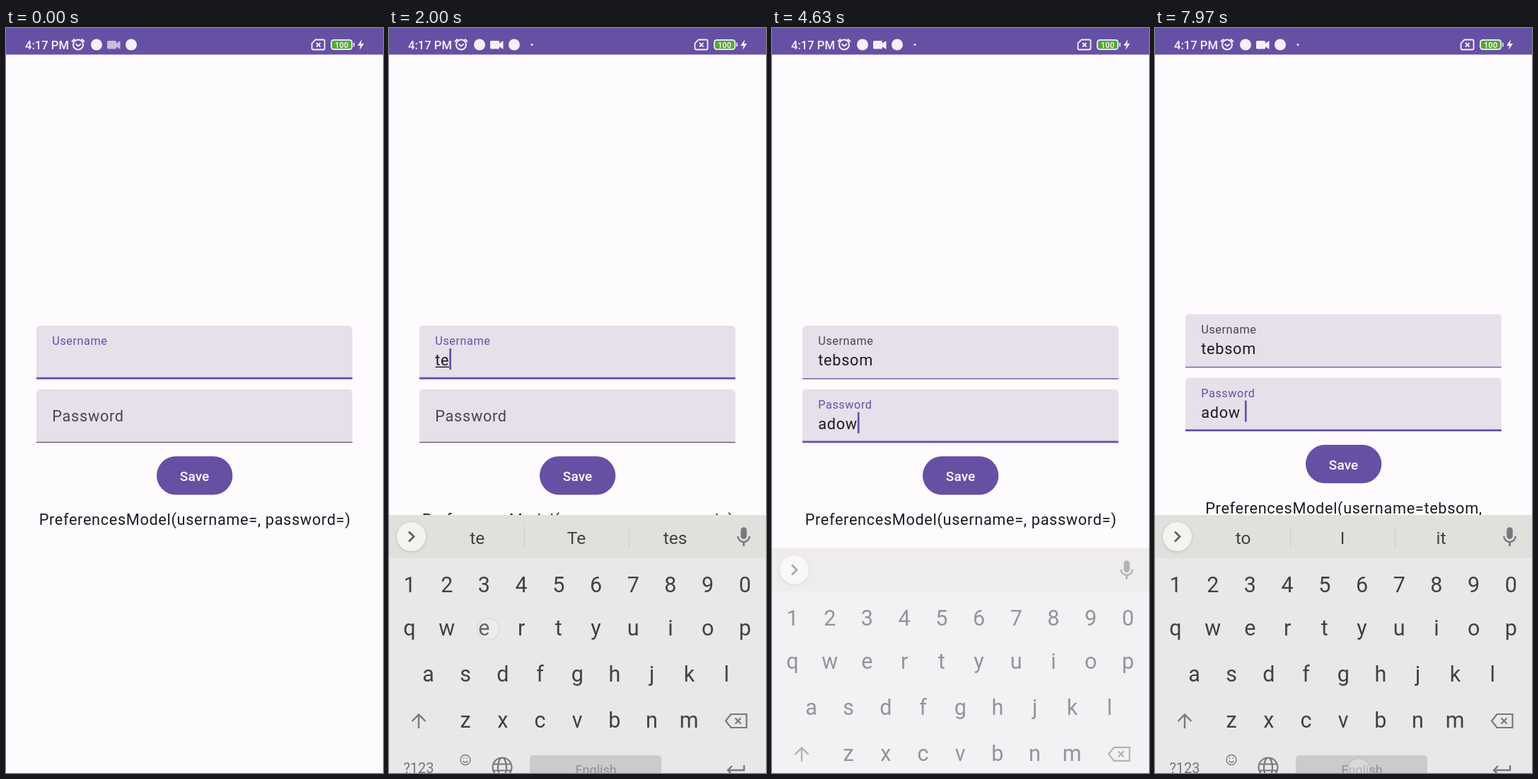
An HTML page with a canvas for the animation above (8 s loop, 533 px wide and 1051 px high).

```html
<!DOCTYPE html>
<html lang="en">
<head>
<meta charset="utf-8">
<title>Saved preferences</title>
<style>
  html, body { margin: 0; width: 100%; height: 100%; overflow: hidden; background: #fefbff; }
  canvas { display: block; width: 533px; height: 1051px; }
</style>
</head>
<body>
<canvas id="stage"></canvas>
<script>
const W = 533, H = 1051, LOOP = 8000;
const canvas = document.getElementById('stage');
const ctx = canvas.getContext('2d');
const dpr = window.devicePixelRatio || 1;
canvas.width = W * dpr;
canvas.height = H * dpr;

const FONT = 'Roboto, sans-serif';
const PAPER = '#fefbff', PURPLE = '#6650a4', INK = '#1c1b1f', MUTED = '#49454f';
const KEY = '#3f4245', ICON = '#77797b';
const USER = 'tebsom', PASS = 'adow';
const ROWS = [
  { keys: '1234567890', x: 29, base: 796, mid: 786 },
  { keys: 'qwertyuiop', x: 29, base: 857, mid: 846 },
  { keys: 'asdfghjkl', x: 55.5, base: 922, mid: 911 },
  { keys: 'zxcvbnm', x: 108, base: 987, mid: 977 }
];
const PITCH = 52.7;

function keyPos(ch) {
  const row = ROWS.find(r => r.keys.includes(ch));
  return { x: row.x + PITCH * row.keys.indexOf(ch), y: row.mid };
}

// Key presses: character, time down, time up, finger offset from the key
const press = (field, ch, down, up, dx = 6, dy = 2) => {
  const p = keyPos(ch);
  return { field, ch, down, up, kx: p.x, ky: p.y, x: p.x + dx, y: p.y + dy };
};
const presses = [
  press('user', 't', 1530, 1610), press('user', 'e', 1800, 1880),
  press('user', 'b', 2040, 2120), press('user', 's', 2250, 2330),
  press('user', 'o', 2440, 2520), press('user', 'm', 2610, 2700, -4, 0),
  press('pass', 'a', 3600, 3680), press('pass', 'd', 3830, 3915, 23, 4),
  press('pass', 'o', 3990, 4060), press('pass', 'w', 4130, 4200)
];
const taps = [
  { x: 252, y: 462, down: 40, up: 200 },
  { x: 240, y: 555, down: 3200, up: 3270 },
  { x: 268, y: 634, down: 4930, up: 5050 },
  { x: 250, y: 540, down: 6640, up: 6740 },
  { x: 288, y: 1046, down: 7790, up: 7880 }
];
const touches = presses.concat(taps);
const FOCUS_PASS = 3270, SAVED = 5060, SPACE = 7880;
const cursorResets = [230, FOCUS_PASS, 6740, SPACE, ...presses.map(p => p.up)].sort((a, b) => a - b);

const clamp = v => Math.max(0, Math.min(1, v));
const mix = (a, b, k) => a + (b - a) * k;
const ease = k => k * k * (3 - 2 * k);

function text(s, x, y, size, color, { align = 'left', weight = 400, gap = 0 } = {}) {
  ctx.font = `${weight} ${size}px ${FONT}`;
  ctx.letterSpacing = gap + 'px';
  ctx.textAlign = align;
  ctx.fillStyle = color;
  ctx.fillText(s, x, y);
}
function box(x, y, w, h, r, color) {
  ctx.beginPath();
  ctx.roundRect(x, y, w, h, r);
  ctx.fillStyle = color;
  ctx.fill();
}
function disc(x, y, r, color) {
  ctx.beginPath();
  ctx.arc(x, y, r, 0, 7);
  ctx.fillStyle = color;
  ctx.fill();
}
// SVG path around a centre point; filled when no line width is given
function icon(d, x, y, color, line = 0, scale = 1) {
  ctx.save();
  ctx.translate(x, y);
  ctx.scale(scale, scale);
  ctx.lineWidth = line;
  ctx.fillStyle = ctx.strokeStyle = color;
  const path = new Path2D(d);
  if (line) ctx.stroke(path); else ctx.fill(path);
  ctx.restore();
}
function shadow(blur, dy, alpha) {
  ctx.shadowColor = `rgba(0,0,0,${alpha})`;
  ctx.shadowBlur = blur * dpr;
  ctx.shadowOffsetY = dy * dpr;
}
const noShadow = () => { ctx.shadowColor = 'transparent'; };

function typed(field, t) {
  return presses.filter(p => p.field === field && t >= p.up).map(p => p.ch).join('');
}

function cursorOn(t) {
  const last = cursorResets.filter(r => r <= t).pop();
  return last !== undefined && Math.floor((t - last) / 500) % 2 === 0;
}

function keyboardState(t) {
  if (t < 300 || (t >= 4760 && t < 6830)) return null;
  if (t >= 4560 && t < 4760) {
    const p = (t - 4560) / 200;
    return { dy: 180 * p ** 1.3, alpha: clamp(1 - 1.25 * p) };
  }
  const p = clamp((t - (t < 4560 ? 300 : 6830)) / 300);
  return { dy: 180 * (1 - p) ** 2, alpha: clamp(p * 1.5) };
}

function suggestions(t) {
  if (t >= 4560 && t < 6830) return [];
  if (t >= SPACE) return ['to', 'I', 'it'];
  if (t >= FOCUS_PASS && t < 3680) return null;
  const word = t < FOCUS_PASS ? typed('user', t) : typed('pass', t);
  if (!word) return null;
  const fixed = { t: ['t', 'to', 'the'], a: ['ad', 'and', 'after'], ad: ['ad', 'and', 'add'] };
  if (fixed[word]) return fixed[word];
  const cap = word[0].toUpperCase() + word.slice(1);
  return [word, cap, word === USER ? word + '...lvek' : word + 's'];
}

function statusBar(t) {
  box(0, 0, W, 37.5, 0, PURPLE);
  const c = '#f4f0fa';
  text('4:17 PM', 27, 29.5, 16.6, c, { weight: 500 });
  icon('M7 0A7 7 0 1 1-7 0A7 7 0 1 1 7 0M-3.5-1L0 2L4-1M-9-4L-5-8M9-4L5-8', 102, 23.5, c, 2);
  disc(128, 23.5, 8, c);
  disc(177, 23.5, 8, c);
  ctx.globalAlpha = mix(.68, 1, clamp(t / 400));
  box(143, 18, 13, 11.5, 1.5, c);
  icon('M12 22L18 18V30L12 26Z', 143.5, 0, c);
  ctx.globalAlpha = 1;
  if ((t > 350 && t < 4760) || t > 6950) disc(202, 23.5, 1.6, c);

  icon('M-4-7H7Q9-7 9-5V5Q9 7 7 7H-7Q-9 7-9 5V-2ZM-2.5-2.5L3 3M3-2.5L-2.5 3', 441.5, 23.5, c, 1.8);
  box(459, 16, 31, 15, 4.5, c);
  box(460.7, 17.7, 27.6, 11.6, 3, '#57a639');
  text('100', 474.5, 27.6, 11, '#fff', { align: 'center', weight: 500 });
  box(491, 20.5, 1.6, 6, 1, c);
  icon('M1.5-7.5L-4.5 1.5H-.5L-1.5 7.5L4.5-1.5H.5Z', 501.5, 23.5, c);
}

function caret(x, y) {
  box(x, y, 2.7, 30, 0, PURPLE);
}

function field(f, t) {
  const height = 75.5, line = f.focused ? 2.8 : 1.5;
  box(43, f.y, 446.7, height, [5, 5, 0, 0], '#e6e0ea');
  box(43, f.y + height - line, 446.7, line, 0, f.focused ? PURPLE : f.idleLine);
  const size = mix(21.75, 16.3, f.raise);
  text(f.label, 65.3, f.y + mix(45, 27, f.raise), size, f.focused ? PURPLE : MUTED,
    { gap: mix(.68, .54, f.raise) });
  text(f.value, 65.3, f.y + 56, 21.75, INK, { gap: .68 });
  const w = ctx.measureText(f.value).width;
  if (f.underline && f.value) box(65.5, f.y + 57.6, w - .5, 1.4, 0, INK);
  if (f.focused && cursorOn(t)) caret(65.3 + w, f.y + 32);
}

function form(t) {
  const saved = t >= SAVED;
  const up = saved ? 16.3 : 0;
  const onPass = t >= FOCUS_PASS;
  field({
    y: 420 - up, label: 'Username', value: typed('user', t), raise: 1,
    focused: !onPass, underline: !onPass, idleLine: '#75699f'
  }, t);
  field({
    y: 509.8 - up, label: 'Password', value: typed('pass', t) + (t >= SPACE ? ' ' : ''),
    raise: ease(clamp((t - FOCUS_PASS) / 150)), focused: onPass,
    underline: t < 4560 || (t >= 6900 && t < SPACE), idleLine: '#6d6675'
  }, t);

  box(213, 604.3 - up, 107.3, 54.2, 27.1, PURPLE);
  const ripple = clamp((t - 4930) / 80) * clamp((5370 - t) / 250);
  if (ripple > 0) box(213, 604.3 - up, 107.3, 54.2, 27.1, `rgba(255,255,255,${.13 * ripple})`);
  text('Save', 266.6, 639 - up, 19, '#fff', { align: 'center', weight: 500, gap: .14 });

  const lines = saved
    ? [`PreferencesModel(username=${USER},`, `password=${PASS})`]
    : ['PreferencesModel(username=, password=)'];
  lines.forEach((s, i) => text(s, 267, 701.3 - up + i * 32.6, 21.75, INK, { align: 'center', gap: .64 }));
}

function gear(x, y) {
  ctx.beginPath();
  for (let i = 0; i < 32; i++) {
    const a = (i + .5) * Math.PI / 16, r = i % 4 < 2 ? 11.5 : 8.6;
    ctx.lineTo(x + r * Math.cos(a), y + r * Math.sin(a));
  }
  ctx.closePath();
  ctx.moveTo(x + 4, y);
  ctx.arc(x, y, 4, 0, 7);
  ctx.fillStyle = ICON;
  ctx.fill('evenodd');
}

function toolbar(t) {
  const words = suggestions(t);
  box(0, 687, W, 61, 0, '#e0e1dd');
  shadow(4, 1, .16);
  disc(31.5, 717.5, 20.5, '#f3f3f0');
  noShadow();
  icon(words ? 'M-3.5-7L3.5 0L-3.5 7' : 'M3.5-7L-3.5 0L3.5 7', 31.5, 717.5, '#5c5f62', 2.7);
  icon('M12 14a3 3 0 0 0 3-3V5a3 3 0 0 0-6 0v6a3 3 0 0 0 3 3zM17 11a5 5 0 0 1-10 0H5.3a6.7 6.7 0 0 0 5.7 6.6V21h2v-3.4a6.7 6.7 0 0 0 5.7-6.6z',
    484.7, 701.5, ICON, 0, 1.4);

  if (!words) {
    icon('M-8-10.5H8Q10.5-10.5 10.5-8V3L3 10.5H-8Q-10.5 10.5-10.5 8V-8Q-10.5-10.5-8-10.5ZM10.5 3H3V10.5M-5 1Q-1 6 4 0M-5-4H-2M3-4H6',
      107, 718, ICON, 2.6);
    text('GIF', 182, 724.5, 18.5, ICON, { align: 'center', weight: 900, gap: 1 });
    icon('M-9.5-9H9.5V11.5H-9.5ZM-5-3H5M-5 2H5M-5 7H2', 257, 718, ICON, 2.4);
    box(252, 705.5, 10, 6, 2, ICON);
    gear(332, 718);
    box(378.5, 703, 1, 29, 0, '#cbcdcd');
    for (const x of [417.5, 425, 432.5]) disc(x, 717.5, 2.5, ICON);
    return;
  }
  if (!words.length) return;
  for (const x of [191, 339]) box(x, 702, 1, 31, 0, '#cbcdcd');
  words.forEach((s, i) => {
    ctx.save();
    ctx.translate([124.7, 265, 404.5][i], 727.5);
    if (s.length > 11) ctx.scale(.74, 1); // long suggestions are condensed
    text(s, 0, 0, 24.5, KEY, { align: 'center' });
    ctx.restore();
  });
}

function bottomRow() {
  text('?123', 42, 1050.5, 20, '#74777a', { align: 'center' });
  icon('M7 0A7 7 0 1 1-7 0A7 7 0 1 1 7 0M-3.5 1.5Q0 5.5 3.5 1.5M-3-2.5H-1.5M1.5-2.5H3', 108, 1032.5, ICON, 1.4);
  icon('M13.5 0A13.5 13.5 0 1 1-13.5 0A13.5 13.5 0 1 1 13.5 0M6 0A6 13.5 0 1 1-6 0A6 13.5 0 1 1 6 0M-12.5-4.5H12.5M-12.5 4.5H12.5',
    160, 1043, ICON, 2.2);
  box(199, 1026, 186, 50, 5, '#cacbca');
  text('English', 292.5, 1052.5, 18, '#8f9194', { align: 'center' });
  icon('M12-6V1H-11M-5-5L-11 1L-5 7', 490, 1046, ICON, 2.4);
}

function keyboard(t) {
  const state = keyboardState(t);
  if (!state) return;
  ctx.save();
  ctx.translate(0, state.dy);
  box(0, 687, W, 400, 0, '#e8e8e8');
  toolbar(t);
  for (const row of ROWS) {
    [...row.keys].forEach((ch, i) =>
      text(ch, row.x + i * PITCH, row.base, 30.5, KEY, { align: 'center' }));
  }
  icon('M0 10V-9M-9.5 0L0-9.5L9.5 0', 42, 978, ICON, 2.4);
  icon('M-7-9.5H15V9.5H-7L-14.5 0ZM-1-4L7 4M7-4L-1 4', 490.5, 977.5, ICON, 2.2);
  bottomRow();

  const held = presses.find(p => t >= p.down && t < p.up);
  if (held) {
    shadow(6, 2, .3);
    box(held.kx - 26, held.ky - 122, 52, 151, 5, '#fcfcfb');
    noShadow();
    text(held.ch, held.kx, held.ky - 70, 37, KEY, { align: 'center' });
  }
  // Fade the finished sheet as one layer
  ctx.globalAlpha = 1 - state.alpha;
  box(0, 687, W, 400, 0, PAPER);
  ctx.restore();
}

function touchMarks(t) {
  for (const p of touches) {
    const a = clamp((t - p.down) / 30) * clamp(1 - (t - p.up) / 200);
    if (t < p.down || a <= 0) continue;
    ctx.globalAlpha = a;
    disc(p.x, p.y, 15.5, 'rgba(250,250,252,.55)');
    ctx.strokeStyle = 'rgba(150,165,195,.55)';
    ctx.lineWidth = 1.6;
    ctx.stroke();
    ctx.globalAlpha = 1;
  }
}

function draw(t) {
  ctx.setTransform(dpr, 0, 0, dpr, 0, 0);
  box(0, 0, W, H, 0, PAPER);
  statusBar(t);
  form(t);
  keyboard(t);
  touchMarks(t);
}

const start = performance.now();
function tick() {
  draw((performance.now() - start) % LOOP);
  requestAnimationFrame(tick);
}
tick();
</script>
</body>
</html>
```
